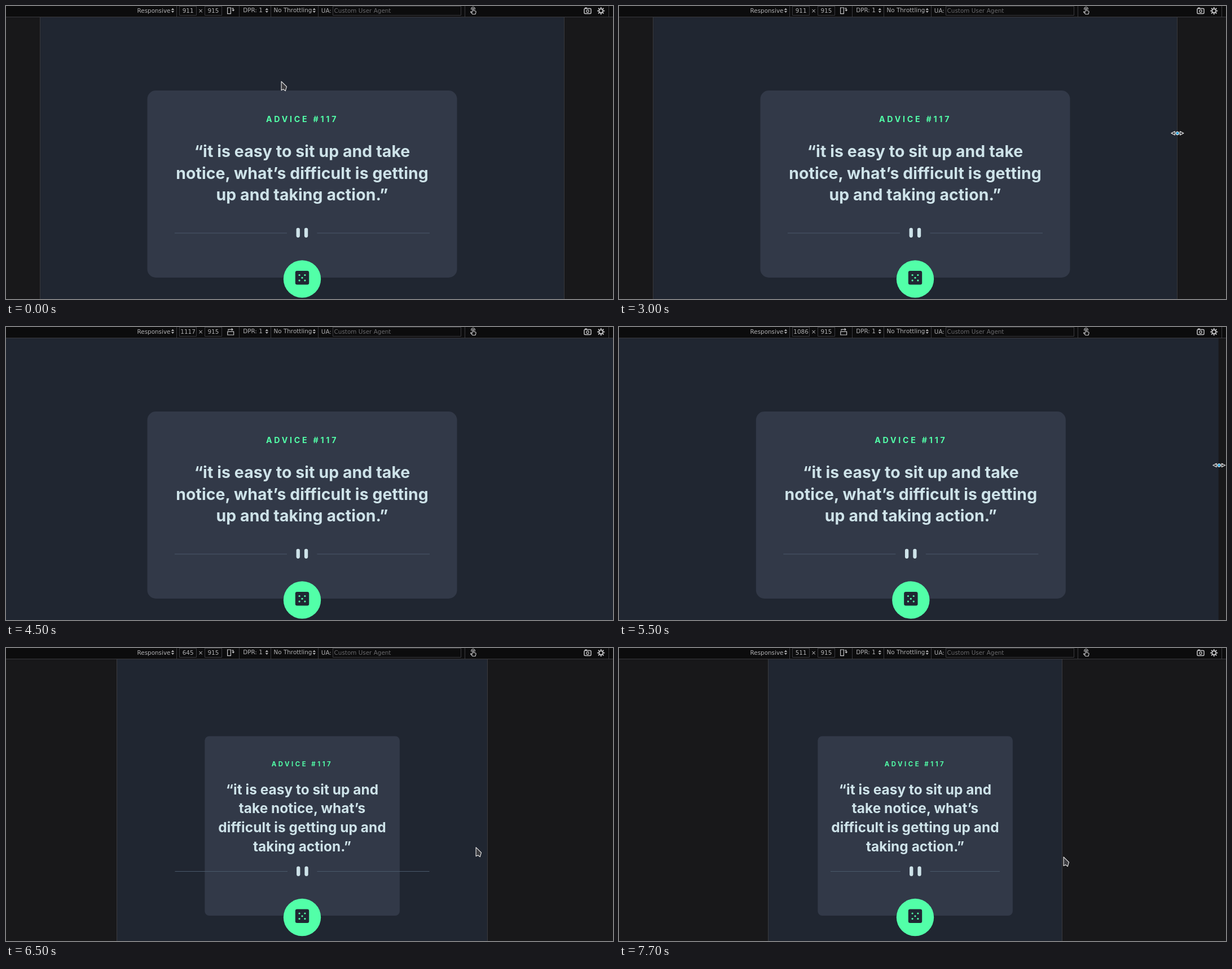
Recreate the animation shown at these times as an HTML page. Size 1076 by 520 pixels, loop 8000 ms.

```html
<!DOCTYPE html>
<html lang="en">
<head>
<meta charset="utf-8">
<title>Responsive advice card</title>
<style>
html, body { margin: 0; width: 100%; height: 100%; overflow: hidden; background: #18181a; }
svg { display: block; width: 1076px; height: 520px; }
.bar text { font: 10.4px "DejaVu Sans", sans-serif; fill: #b1b1b3; }
.bar .hint { fill: #69696c; }
.bar .mid { text-anchor: middle; }
.box, .sep { fill: none; stroke: #3a3a3e; }
.icon { fill: none; stroke: #c4c4c6; stroke-width: 1.2; }
.card text { font-family: Inter, sans-serif; font-weight: 700; font-optical-sizing: none; text-anchor: middle; fill: #cee3e9; }
.card .title { fill: #52ffa8; }
.rule { fill: none; stroke: #4a596a; stroke-width: 1.1; }
</style>
</head>
<body>
<svg viewBox="0 0 1076 520" xmlns="http://www.w3.org/2000/svg">
  <defs>
    <path id="pick" d="M-2.7 7L0 3.8 2.7 7zM-2.7 8.8L0 12 2.7 8.8z" fill="#b1b1b3"/>
    <g id="button">
      <circle r="33.2" fill="#52ffa8"/>
      <rect x="-12.2" y="-14.4" width="24.4" height="24.4" rx="3.2" fill="#202733"/>
      <g fill="#52ffa8">
        <circle cx="-4.9" cy="-7" r="1.6"/><circle cx="4.9" cy="-7" r="1.6"/>
        <circle cy="-2.2" r="1.6"/>
        <circle cx="-4.9" cy="2.6" r="1.6"/><circle cx="4.9" cy="2.6" r="1.6"/>
      </g>
    </g>
    <g id="bars" fill="#cee3e9">
      <rect x="-10.4" y="-8.6" width="6.3" height="17.2" rx="3.1"/>
      <rect x="3.9" y="-8.6" width="6.3" height="17.2" rx="3.1"/>
    </g>
  </defs>

  <rect width="1076" height="520" fill="#18181a"/>
  <rect id="page" y="20" height="500" fill="#202631"/>
  <path id="edges" class="sep"/>

  <g id="wide" class="card">
    <rect x="-274.5" y="150" width="549" height="332" rx="15" fill="#323948"/>
    <text class="title" y="206.3" font-size="14.2" letter-spacing="3.75">ADVICE #117</text>
    <g font-size="28.4" letter-spacing=".1">
      <text y="268">“it is easy to sit up and take</text>
      <text y="306.5">notice, what’s difficult is getting</text>
      <text y="345">up and taking action.”</text>
    </g>
    <path class="rule" d="M-226 403H-27M26.5 403H226"/>
    <use href="#bars" y="402.3"/>
    <use href="#button" y="484.5"/>
  </g>

  <g id="narrow" class="card">
    <rect x="-172.7" y="156.5" width="345.6" height="318.5" rx="8" fill="#323948"/>
    <text class="title" y="210.3" font-size="11.4" letter-spacing="3.5">ADVICE #117</text>
    <g font-size="24.4" letter-spacing=".05">
      <text y="259.5">“it is easy to sit up and</text>
      <text y="293.2">take notice, what’s</text>
      <text y="326.9">difficult is getting up and</text>
      <text y="360.5">taking action.”</text>
    </g>
    <path id="rule" class="rule"/>
    <use href="#bars" x=".5" y="396.2"/>
    <use href="#button" y="478"/>
  </g>

  <g class="bar">
    <rect width="1076" height="20" fill="#0c0c0d"/>
    <path class="sep" d="M0 19.5H1076M302.5 0V19M413.5 0V19M469.5 0V19M553.5 0V19M813.5 0V19M1068.5 0V19"/>
    <path class="box" d="M307.5 0V16.5H337.5V0M352.5 0V16.5H382.5V0M579.5 0V16.5H806.5V0"/>
    <path class="box" d="M307 .5H338M352 .5H383M579 .5H807"/>
    <text x="232.5" y="12">Responsive</text>
    <text id="size" class="mid" x="322.6" y="12">911</text>
    <text class="mid" x="345" y="12">×</text>
    <text class="mid" x="367.4" y="12">915</text>
    <text x="420.2" y="11.4">DPR: 1</text>
    <text x="474.5" y="11.4">No Throttling</text>
    <text x="558.8" y="12">UA:</text>
    <text class="hint" x="581.6" y="12">Custom User Agent</text>
    <use href="#pick" x="295.5"/><use href="#pick" x="462.3"/><use href="#pick" x="546.3"/>
    <path id="tall" class="icon" d="M392.6 3H398.4V13.6H392.6zM400.2 4.2H402.8V8M401 6.6L402.8 8.6 404.6 6.6"/>
    <path id="flat" class="icon" d="M392.8 8.2H403.6V14H392.8zM394 6.4V4.4H401.5M399.8 2.4L402 4.4 399.8 6.4"/>
    <path class="icon" d="M827 10V4.6Q828 3.4 829 4.6V8L832.4 9Q833.4 9.6 833 11L832 14.5H827L823.6 10.6Q824.4 9.4 825.4 10.2L827 11.4M825 6.4A3.3 3.3 0 1 1 831 6.4"/>
    <g class="icon">
      <rect x="1025" y="4.6" width="12" height="9" rx="1.5" stroke-width="1.5"/>
      <path d="M1026 3.4H1030" stroke-width="1.6"/>
      <circle cx="1031" cy="9.1" r="2.2"/>
      <g transform="translate(1054.7 8.6)" stroke-width="1.8">
        <circle r="3.4"/>
        <path id="teeth" d="M0 -6.6V-3.6M0 3.6V6.6M-6.6 0H-3.6M3.6 0H6.6"/>
        <use href="#teeth" transform="rotate(45)"/>
      </g>
    </g>
  </g>

  <path id="arrow" d="M.6.8V16.6L4 14.8 7.8 17.6 10 10.2z" fill="#3c3c40" stroke="#f0f0f0" stroke-width="1.1" stroke-linejoin="round"/>
  <g id="drag" stroke="#f0f0f0" stroke-width="1.1" stroke-linejoin="round">
    <path d="M-11-.1L-4.6-3.3V3.1zM11-.1L4.6-3.3V3.1z" fill="#333337"/>
    <circle r="2.8" fill="#2aa3dc"/>
  </g>
</svg>
<script>
const LOOP = 8000, SCALE = 1.0185, MID = 525;
const GRAB = 3000, DROP = 6500;
const $ = id => document.getElementById(id);

// Key points as [time, value].
const widths = [[3200, 911], [3600, 994], [4500, 1117], [5300, 1117], [5600, 1071],
  [5700, 969], [6000, 870], [6500, 645], [7100, 536], [7700, 511]];
const xs = [[0, 487.5], [100, 508], [300, 508], [1200, 983], [1400, 997], [2600, 990],
  [DROP, 832.5], [7100, 794], [7700, 787.5]];
const ys = [[0, 133], [100, 150], [300, 150], [1200, 230], [1400, 224], [2600, 225],
  [5400, 240], [6000, 314], [DROP, 353], [7700, 370]];

const ticks = [3000, 3200, 3400, 3600, 3800, 4000, 4300, 4500, 5500, 5700,
  6000, 6300, 6500, 6900, 7100, 7400, 7700];

const linear = p => p;
const smooth = p => p * p * (3 - 2 * p);

function track(keys, t, ease) {
  const i = keys.findIndex(key => key[0] > t);
  if (i === 0) return keys[0][1];
  if (i < 0) return keys[keys.length - 1][1];
  const [t0, a] = keys[i - 1], [t1, b] = keys[i];
  return a + (b - a) * ease((t - t0) / (t1 - t0));
}

const widthAt = t => Math.round(track(widths, t, linear));
const snap = t => t < GRAB ? Math.floor(t / 100) * 100 : ticks.findLast(tick => tick <= t);
const show = (id, on) => $(id).setAttribute("display", on ? "inline" : "none");
const place = (id, x, y) => $(id).setAttribute("transform", `translate(${x} ${y})`);

function draw(time) {
  const t = snap(time);
  const drag = t >= GRAB && t < DROP;
  const width = widthAt(t);
  // The pointer runs ahead of the frame; the content follows it when shrinking.
  const pull = drag ? widthAt(t + 100) - width : 0;
  const inner = width + (pull > 0 ? pull * .3 : pull);
  const left = MID - width * SCALE / 2;
  const right = left + width * SCALE;

  $("size").textContent = width;
  show("tall", width <= 915);
  show("flat", width > 915);

  $("page").setAttribute("x", left);
  $("page").setAttribute("width", Math.min(width, inner) * SCALE);
  $("edges").setAttribute("d", `M${Math.round(left) - .5} 20V520M${Math.round(right) + .5} 20V520`);

  const narrow = inner < 680;
  show("wide", !narrow);
  show("narrow", narrow);
  place(narrow ? "narrow" : "wide", left + inner * SCALE / 2, 0);
  const reach = inner < 600 ? 150 : 225.5;
  $("rule").setAttribute("d", `M${-reach} 396.5H-26M26.5 396.5H${reach}`);

  const x = drag ? right + pull * SCALE + 1 : track(xs, t, smooth);
  show("drag", drag);
  show("arrow", !drag);
  place(drag ? "drag" : "arrow", x, track(ys, t, smooth));
}

const start = performance.now();
function tick() {
  draw((performance.now() - start) % LOOP);
  requestAnimationFrame(tick);
}
tick();
</script>
</body>
</html>
```
